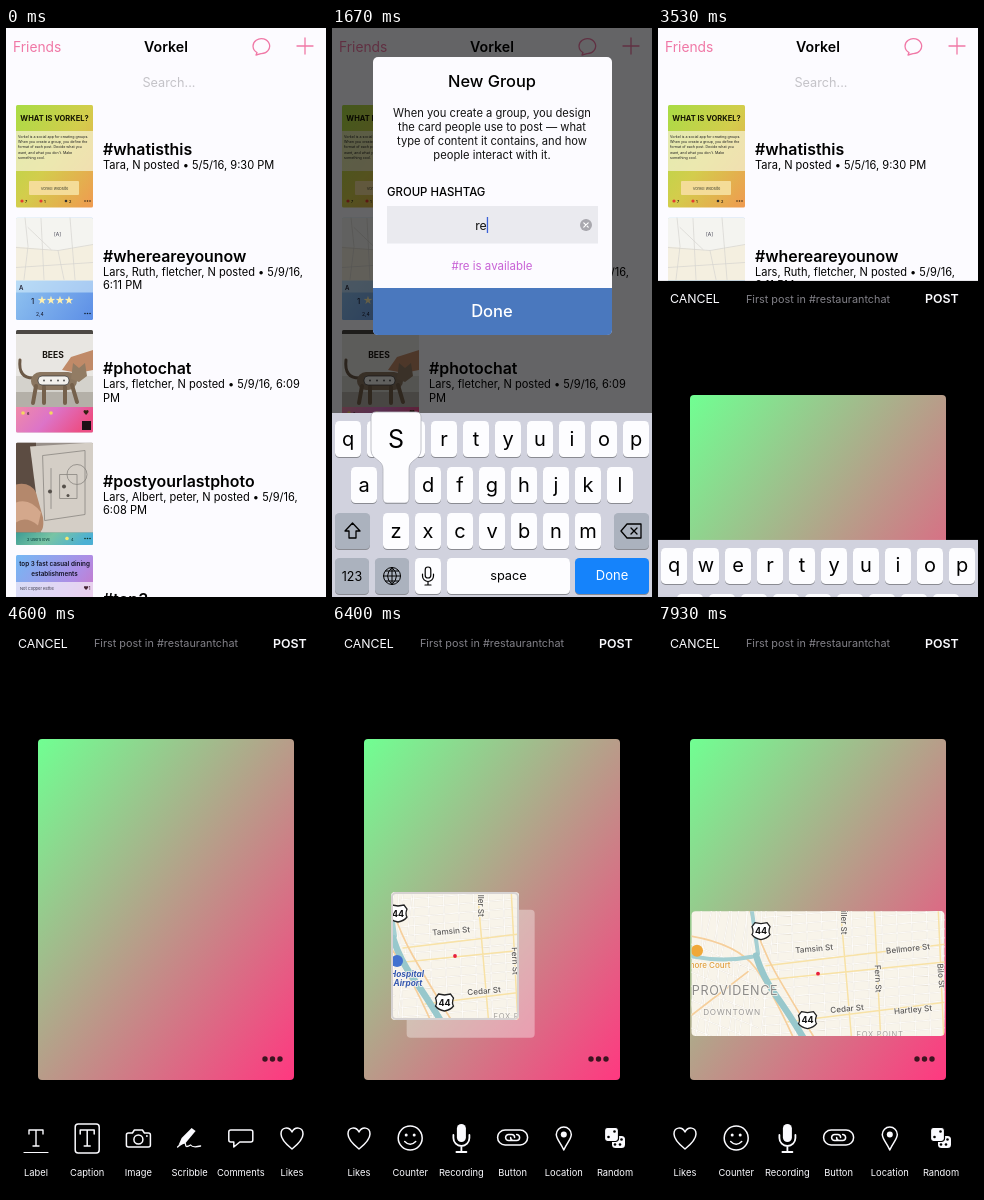
Recreate the animation shown at these times as an HTML page. Size 320x569 px, loop 8000 ms.

```html
<!DOCTYPE html>
<html lang="en">
<head>
<meta charset="utf-8">
<title>New group</title>
<style>
html, body { margin: 0; width: 100%; height: 100%; overflow: hidden; background: #fff; }
svg { display: block; width: 100%; height: 100%; font-family: Inter, "Noto Sans", sans-serif; }
text { white-space: pre; }
</style>
</head>
<body>
<svg id="stage" viewBox="0 0 320 569" preserveAspectRatio="none"></svg>
<script>
const LOOP = 8000;
const MID = 'text-anchor="middle"', SEMI = 'font-weight="600"', MED = 'font-weight="500"';
const PALE = '#fbfbff', PINK = '#f078a6';

const text = (x, y, s, size, fill = '#000', more = '') =>
  `<text x="${x}" y="${y}" font-size="${size}" fill="${fill}" ${more}>${s}</text>`;
const rect = (x, y, w, h, fill, r = 0, more = '') =>
  `<rect x="${x}" y="${y}" width="${w}" height="${h}" rx="${r}" fill="${fill}" ${more}/>`;
const circle = (x, y, r, fill, more = '') => `<circle cx="${x}" cy="${y}" r="${r}" fill="${fill}" ${more}/>`;
const line = (d, stroke, w = 1, more = '') =>
  `<path d="${d}" fill="none" stroke="${stroke}" stroke-width="${w}" stroke-linecap="round" stroke-linejoin="round" ${more}/>`;
const shape = (d, fill, more = '') => `<path d="${d}" fill="${fill}" ${more}/>`;
const group = (x, y, body, more = '') => `<g transform="translate(${x} ${y})" ${more}>${body}</g>`;
const gradient = (id, colors, x2 = 1, y2 = 1) =>
  `<linearGradient id="${id}" x2="${x2}" y2="${y2}">` +
  colors.map((c, i) => `<stop offset="${i / (colors.length - 1)}" stop-color="${c}"/>`).join('') + '</linearGradient>';

const defs = '<defs>' +
  gradient('card', ['#70ff92', '#b89c89', '#ff3880']) +
  gradient('intro', ['#a9dc45', '#d3cd4c', '#f09a50']) +
  gradient('sky', ['#a8dcf4', '#5c8ee6']) +
  gradient('berry', ['#f08aa8', '#dc74c8', '#ec4f86'], 1, .3) +
  gradient('sea', ['#3c9c94', '#78c4a4', '#4cb0d4'], 1, .2) +
  gradient('rose', ['#74b8f4', '#b08ce4', '#f0589c']) +
  '<clipPath id="thumb"><rect width="77" height="102.5" rx="1.5"/></clipPath>' +
  '<clipPath id="mapClip"><rect id="mapBox" rx="4"/></clipPath></defs>';

// ---- list of groups ----
const introLines = ['Vorkel is a social app for creating groups.', 'When you create a group, you define the',
  'format of each post. Decide what you', 'want, and what you don\'t. Make', 'something cool.'];
const dots = color => [69, 71.5, 74].map(x => circle(x, 96, .8, color)).join('');
const thumbs = [
  rect(0, 0, 77, 103, 'url(#intro)') + text(38.5, 15.5, 'WHAT IS VORKEL?', 7.5, '#141400', MID + ' font-weight="700"') +
    rect(0, 26, 77, 40, '#f4f0d0', 0, 'opacity=".75"') +
    introLines.map((s, i) => text(2, 33 + i * 5.2, s, 3.6, '#222')).join('') +
    rect(13, 76, 50, 14, '#f4dc98', 1) + text(38.5, 84.5, 'Vorkel website', 4, '#443', MID) +
    circle(6, 96, 1.6, '#e43c30') + text(9, 97.5, '7', 4) + circle(25, 96, 1.6, '#e43c30') + text(28, 97.5, '1', 4) +
    circle(50, 96, 1.3, '#333') + text(53, 97.5, '2', 4) + dots('#321'),
  rect(0, 0, 77, 103, 'url(#sky)') + rect(0, 0, 77, 63, '#f4f4f0') +
    shape('M0 29L42 33L77 27V63H0Z', '#f4efe0') +
    line('M0 30L42 33L77 27M9 0L12 29L8 62M25 1L28 62M54 0L59 62M0 50L77 45M12 10L35 32M42 33L48 62', '#d6d4d0', .7) +
    text(38, 18, '[A]', 5, '#445') + rect(0, 63, 77, 12, '#d4ecfa', 0, 'opacity=".6"') +
    text(3, 72, 'A', 6, '#223', SEMI) + text(15, 86, '1', 8, '#112') +
    [26, 35, 44, 53].map(x => text(x, 86.5, '★', 10, '#fff0b0', MID)).join('') +
    text(20, 98, '2,4', 5, '#112') + dots('#123'),
  rect(0, 0, 77, 103, '#d4d2cc') + rect(0, 0, 77, 4, '#4c4844') + rect(0, 4, 77, 42, '#e8e6e2') +
    rect(0, 62, 77, 16, '#b4b0a8') + text(37, 28, 'BEES', 8.5, '#18140f', MID + ' font-weight="700"') +
    shape('M46 40L55 27L77 20V40L62 43Z', '#c08a68') + line('M4 30Q2 48 17 48', '#6c5a48', 3) +
    rect(15, 42, 46, 18, '#8a7660', 9) + shape('M55 49L57 33L63 38L69 33L71 46L63 52Z', '#927c64') +
    line('M20 56L17 73M28 57V73M49 57V73M56 55L61 72', '#75614c', 4) +
    rect(22, 46, 31, 9, '#f2f0ec', 4, 'stroke="#333" stroke-width=".7"') +
    [28, 35, 42, 48].map(x => circle(x, 50.5, 1, '#555')).join('') +
    rect(0, 77, 77, 26, 'url(#berry)') + circle(7, 83, 1.8, '#f4d860') + text(11, 85, '6', 4) +
    circle(35, 83, 1.8, '#f4d860') + text(70, 85, '♥', 6, '#321', MID) + rect(66, 91, 9, 9, '#1c1014'),
  rect(0, 0, 77, 103, '#98908a') + rect(0, 0, 20, 90, '#5c4c42') +
    shape('M14 4L77 0V90H25Z', '#d4cec6') + line('M27 13L69 8V72L29 78ZM44 32H61V56H44ZM35 26V66', '#8a8680', .8) +
    circle(61, 32, 10, 'none', 'stroke="#8a8680" stroke-width=".8"') + circle(34, 49, 2, '#55504a') +
    circle(48, 44, 2, '#55504a') + circle(52, 53, 1.5, '#55504a') +
    shape('M0 42Q14 39 20 50L27 75Q29 91 20 90H0Z', '#b4886c') + shape('M0 60Q14 55 25 70L22 83Q10 73 0 80Z', '#d4a88c') +
    rect(0, 90, 77, 13, 'url(#sea)') + text(11, 98, '2 users love', 4, '#033') + circle(51, 96, 1.8, '#f4e870') +
    text(55, 98, '4', 4, '#033') + dots('#132'),
  rect(0, 0, 77, 103, 'url(#rose)') + text(38.5, 11, 'top 3 fast casual dining', 6.3, '#112', MID + ' ' + SEMI) +
    text(38.5, 20.5, 'establishments', 6.3, '#112', MID + ' ' + SEMI) +
    rect(0, 27, 77, 16, '#f4ecf8', 0, 'opacity=".75"') + text(4, 34.5, 'Not Copper Kettle', 4, '#334') +
    text(71, 35, '♥1', 5, '#423', MID)
];
const rows = [
  ['#whatisthis', 'Tara, N posted • 5/5/16, 9:30 PM'],
  ['#whereareyounow', 'Lars, Ruth, fletcher, N posted • 5/9/16,', '6:11 PM'],
  ['#photochat', 'Lars, fletcher, N posted • 5/9/16, 6:09', 'PM'],
  ['#postyourlastphoto', 'Lars, Albert, peter, N posted • 5/9/16,', '6:08 PM'],
  ['#top3', '']
];
const list = rect(0, 0, 320, 569, '#fcfbff') +
  text(7, 24, 'Friends', 13.8, PINK) + text(160, 24, 'Vorkel', 14.2, '#000', MID + ' ' + SEMI) +
  line('M251 24.5A8.3 7.5 0 1 1 255 25.6L250 27Z', PINK, 1.3) + line('M291 18H307M299 10V26', PINK, 1.3) +
  text(163, 59, 'Search...', 12.7, '#c4c3c8', MID) +
  rows.map(([tag, ...info], i) => {
    const y = 77 + i * 112.5, top = y + (info.length > 1 ? 44 : 50);
    return group(10, y, thumbs[i], 'clip-path="url(#thumb)"') + text(97, top, tag, 15.9, '#000', SEMI) +
      info.map((s, k) => text(97, top + 14.3 + k * 13.6, s, 11.05)).join('');
  }).join('');

// ---- new group dialog ----
const blurb = ['When you create a group, you design', 'the card people use to post — what',
  'type of content it contains, and how', 'people interact with it.'];
const dialog = rect(41, 29, 239, 278, '#fcfbff', 5) + shape('M41 260H280V302Q280 307 275 307H46Q41 307 41 302Z', '#4a78be') +
  text(160, 59, 'New Group', 16.4, '#000', MID + ' ' + MED) +
  blurb.map((s, i) => text(160, 88.5 + i * 14.2, s, 11.2, '#111', MID)).join('') +
  text(55, 168, 'GROUP HASHTAG', 11.4, '#000', MED) + rect(55, 178, 211, 37.5, '#eaeaef') +
  text(149, 201.5, '', 12.3, '#111', MID + ' id="field"') + rect(0, 189, 1.3, 16, '#3c62d8', 0, 'id="caret"') +
  `<g id="clear">${circle(254, 197, 6, '#a9a8ae')}${line('M251.8 194.8L256.2 199.2M256.2 194.8L251.8 199.2', '#fff', 1.2)}</g>` +
  text(160, 242, '', 11.5, '#c862d6', MID + ' id="status"') + text(160, 289, 'Done', 16.6, '#fff', MID + ' ' + MED);

// ---- keyboard ----
const keyPos = {};
const cap = (x, y, w, fill) => rect(x, y - 17, w, 36, '#8a8b92', 4.5) + rect(x, y - 18, w, 36, fill, 4.5);
const letters = [['qwertyuiop', 16, 411], ['asdfghjkl', 32, 457], ['zxcvbnm', 64, 503]].map(([keys, x0, y]) =>
  [...keys].map((c, i) => {
    const x = x0 + i * 32;
    keyPos[c] = [x, y];
    return cap(x - 13, y, 26, '#fdfdff') + text(x, y + 6.5, c, 20, '#000', MID);
  }).join('')).join('');
const GRAY = '#abb2be';
const keyboard = rect(0, 385, 320, 184, '#d1d2de') + letters +
  cap(3, 503, 35, GRAY) + line('M20.5 495L28 503H24V510H17V503H13Z', '#000', 1.3) +
  cap(282, 503, 35, GRAY) + line('M289 503L295 496H309V510H295ZM299 500L305 506M305 500L299 506', '#000', 1.3) +
  cap(3, 548, 34, GRAY) + text(20, 552.5, '123', 12.5, '#000', MID) + cap(43, 548, 34, GRAY) +
  line('M51.5 548A8.5 8.5 0 1 1 68.5 548A8.5 8.5 0 1 1 51.5 548M60 539.5V556.5M51.5 548H68.5M60 539.5Q51 548 60 556.5Q69 548 60 539.5M53.5 543H66.5M53.5 553H66.5', '#000', 1) +
  cap(83, 548, 26, '#fdfdff') + rect(93.2, 539, 5.6, 11, 'none', 2.8, 'stroke="#000" stroke-width="1.2"') +
  line('M90.5 546V548A5.5 5.5 0 0 0 101.5 548V546M96 553.5V557M93 557H99', '#000', 1.2) +
  cap(115, 548, 123, '#fdfdff') + text(176.5, 552.3, 'space', 12.8, '#000', MID) +
  cap(243, 548, 74, '#1583fb') + text(280, 552.3, 'Done', 13, '#fff', MID) +
  `<g id="popup">${shape('M-20 -73H20Q25 -73 25 -68V-35C25 -25 13 -26 13 -16V14Q13 18 9 18H-9Q-13 18 -13 14V-16C-13 -26 -25 -25 -25 -35V-68Q-25 -73 -20 -73Z',
    '#fdfdff', 'stroke="#b0b1ba" stroke-width=".8"')}${text(0, -37, '', 25, '#000', MID + ' id="popLetter"')}</g>`;

// ---- post editor ----
const ink = (d, w = 1.5) => line(d, PALE, w);
const ringed = `stroke="${PALE}" stroke-width="1.5"`;
const tee = 'M-7 -4V-8H7V-4M0 -8V8M-3 8H3';
const pips = (spots, r) => spots.map(([x, y]) => circle(x, y, r, '#000')).join('');
const tools = {
  Label: ink(tee, 1.4) + ink('M-12 14.5H12', 1.2),
  Caption: rect(-12, -14, 24, 29, 'none', 3, ringed) + ink(tee),
  Image: ink('M-10 -5H-6L-4 -8H4L6 -5H10Q12 -5 12 -3V7Q12 9 10 9H-10Q-12 9 -12 7V-3Q-12 -5 -10 -5Z') +
    circle(0, 1.5, 4.5, 'none', ringed) + circle(8.5, -2, .9, PALE),
  Scribble: shape('M-11 7L-8 0L2 -10L6 -7L-4 5Z', PALE) + ink('M-12 9Q-4 2 -4 7Q-4 10 1 7Q3 10 11 8', 1.3),
  Comments: ink('M-10 -8H10Q12 -8 12 -6V2Q12 4 10 4H-1L-7 9V4H-10Q-12 4 -12 2V-6Q-12 -8 -10 -8Z'),
  Likes: ink('M0 11C-5 7 -11 2 -11 -4C-11 -11 -3 -12 0 -6C3 -12 11 -11 11 -4C11 2 5 7 0 11Z'),
  Counter: circle(0, 0, 12, 'none', ringed) + circle(-4, -3, 1.5, PALE) + circle(4, -3, 1.5, PALE) + ink('M-5.5 3.5Q0 9 5.5 3.5'),
  Recording: rect(-4.5, -14, 9, 18, PALE, 4.5) + ink('M-8 -3V0A8 8 0 0 0 8 0V-3M0 8V14M-5 14H5', 1.8),
  Button: rect(-15, -8, 30, 15, 'none', 7.5, ringed) +
    ink('M1 2.5H-4A3 3 0 0 1 -4 -3.5H-1Q2 -3.5 2 -.5M4 -3.5A3 3 0 0 1 4 2.5H1Q-2 2.5 -2 -.5'),
  Location: ink('M0 12C-3 5 -7.5 1 -7.5 -3.5A7.5 7.5 0 0 1 7.5 -3.5C7.5 1 3 5 0 12Z') + circle(0, -3.5, 3, PALE),
  Random: rect(-3, -2, 13, 12, PALE, 3.5) + rect(-10.5, -10.5, 14, 14, PALE, 3, 'stroke="#000" stroke-width="1.2"') +
    pips([[-6.5, -1], [-.5, -6.5], [6.5, 1.5], [5, 6.5], [0, 6.5]], 1.3)
};
const toolbar = Object.entries(tools).map(([name, icon], i) =>
  group(30 + i * 51.2, 513, icon + text(0, 38, name, 9.35, PALE, MID))).join('');

// Map drawn around its pin at 0,0.
const label = (x, y, s, angle, size = 8.1, fill = '#5c5a58', more = MED) =>
  `<g transform="translate(${x} ${y}) rotate(${angle})">${text(0, 2.8, s, size, fill,
    MID + ' ' + more + ' stroke="#faf7f0" stroke-width="1.6" paint-order="stroke"')}</g>`;
const airport = 'font-style="italic" font-weight="700"';
let blocks = '';
for (let i = -9; i < 10; i++) blocks += `M${i * 15 + 3} -70L${i * 15 + 8} 70M-55 ${i * 9 + 7}L140 ${i * 9 - 10}`;
for (let i = 0; i < 8; i++) blocks += `M-140 ${i * 14 - 35}L-60 ${i * 14 - 2}M${-135 + i * 11} 70L${-105 + i * 9} -70`;
const shield = (x, y) => group(x, y,
  shape('M-6 -8L0 -7L6 -8L9 -4Q7 1 9 4Q6 8 0 9Q-6 8 -9 4Q-7 1 -9 -4Z', '#fff', 'stroke="#222" stroke-width="1.3"') +
  text(0, 3.6, '44', 9, '#111', MID + ' font-weight="700"'));
const map = rect(-140, -75, 280, 150, '#f8f4ea') + line(blocks, '#e9e3d8', 1.5) + line(blocks, '#fffefc', .9) +
  line('M-52 -8L140 -31M-50 6L140 -13M-30 48L140 27M22 -70L34 70M56 -70L63 70M120 -70L126 70', '#f8e2a6', 1.5) +
  line('M-130 -38Q-80 -30 -62 -5T-22 70M-70 -70Q-58 -28 -42 0T0 70M-140 52L-70 -2', '#f6cf9c', 1.7) +
  line('M-130 -18Q-96 -11 -66 -17M-66 -62L-60 -20', '#a4cfd2', 4) +
  line('M-62 -18Q-55 4 -42 22T-11 70', '#98c8cc', 6.5) +
  label(-4, -25, 'Tamsin St', -5) + label(90, -25, 'Bellmore St', -6) + label(29, 35, 'Cedar St', -5) +
  label(95, 36, 'Hartley St', -5) + label(26, -55, 'Miller St', 90) + label(60, 5, 'Fern St', 88) +
  label(123, 2, 'Bilo St', 85) + label(62, 60, 'FOX POINT', 0, 7.6, '#a3a09c', 'letter-spacing=".7"') +
  `<g id="near">${circle(-58, 5, 6, '#4272d0')}${label(-48, 18, 'Hospital', 0, 8.3, '#3458b0', airport)}` +
  `${label(-47, 27, 'Airport', 0, 8.3, '#3458b0', airport)}</g>` +
  `<g id="far">${circle(-121, -23, 6, '#f0a838')}${label(-109, -9, 'more Court', 0, 8, '#e0a040')}` +
  `${label(-83, 18, 'PROVIDENCE', 0, 12.6, '#8c8a88', 'letter-spacing=".6"')}${label(-86, 38, 'DOWNTOWN', 0, 8.2, '#9a9896', 'letter-spacing=".7"')}</g>` +
  shield(-57, -43) + shield(-10.5, 46) + circle(0, 0, 1.9, '#e8203c');

const editor = rect(0, 0, 320, 569, '#000') + text(12, 22.5, 'CANCEL', 12.3, PALE) +
  text(160, 22, 'First post in #restaurantchat', 10.85, '#828188', MID) + text(267, 22.5, 'POST', 12.4, PALE, SEMI) +
  rect(32, 114, 256, 341, 'url(#card)', 4) + [259, 266.5, 274].map(x => circle(x, 434, 2.7, '#3c1420')).join('') +
  `<g id="tools">${toolbar}</g>` + rect(0, 0, 128, 128, '#fff', 4, 'id="ghost" opacity=".36"') +
  `<g id="widget"><g clip-path="url(#mapClip)">${map}</g><rect id="rim" rx="4" fill="none" stroke="#d6d2d2" stroke-width="2"/></g>`;

document.getElementById('stage').innerHTML = defs + list +
  rect(0, 0, 320, 569, '#000', 0, 'id="dim"') + `<g id="dialog">${dialog}</g><g id="editor">${editor}</g><g id="keyboard">${keyboard}</g>`;

// ---- motion ----
const ui = {};
document.querySelectorAll('#stage [id]').forEach(n => ui[n.id] = n);
const set = (node, attrs) => { for (const k in attrs) node.setAttribute(k, attrs[k]); };
const move = (node, x, y, s = 1) => set(node, { transform: `translate(${x} ${y}) scale(${s})` });
const show = (node, on) => set(node, { visibility: on ? 'visible' : 'hidden' });
const clamp = (v, lo = 0, hi = 1) => Math.min(hi, Math.max(lo, v));
const ramp = (t, a, b) => clamp((t - a) / (b - a));
const inOut = p => p * p * (3 - 2 * p);
const out = p => 1 - (1 - p) ** 3;
const mix = (a, b, p) => a + (b - a) * p;
const spring = ms => { const x = Math.max(0, ms) * .01826; return 1 - (1 + x) * Math.exp(-x); };

const WORD = 'restaurantchat', FIRST_KEY = 1410, KEY_GAP = 116, KEY_HOLD = 85, CELL = 256 / 6;

function typing(t) {
  const since = t - FIRST_KEY, n = Math.floor(since / KEY_GAP);
  const typed = WORD.slice(0, clamp(Math.floor((since - KEY_HOLD) / KEY_GAP) + 1, 0, WORD.length));
  const pressed = n >= 0 && n < WORD.length && since % KEY_GAP < KEY_HOLD;
  show(ui.popup, pressed);
  if (pressed) {
    move(ui.popup, ...keyPos[WORD[n]]);
    ui.popLetter.textContent = WORD[n].toUpperCase();
  }
  ui.field.textContent = typed;
  ui.status.textContent = typed && `#${typed} is available`;
  set(ui.caret, { x: 149 + (typed ? ui.field.getComputedTextLength() / 2 : 0) });
  set(ui.clear, { opacity: typed ? 1 : 0 });
}

function placing(t) {
  const lift = out(ramp(t, 5750, 6350)), shift = inOut(ramp(t, 6420, 6600)), drop = out(ramp(t, 6620, 6740));
  const wide = 128 * (1 + inOut(ramp(t, 6850, 7500)));
  let x = mix(mix(231, 123, lift), 94, shift), y = mix(mix(513, 331, lift), 346, shift);
  const col = clamp(Math.round((x - 96) / CELL), 0, 3), row = clamp(Math.round((y - 178) / CELL), 0, 5);
  move(ui.ghost, 32 + col * CELL, 114 + row * CELL);
  show(ui.ghost, t > 5950 && t < 6700);
  x = mix(x, 32 + wide / 2, drop);
  y = mix(y, 348.7, drop);
  const inset = 1.6 * drop, w = wide - 2 * inset, h = 128 - 2 * inset;
  set(ui.mapBox, { x: -w / 2, y: -h / 2, width: w, height: h });
  set(ui.rim, { x: 1 - w / 2, y: 1 - h / 2, width: w - 2, height: h - 2, opacity: 1 - drop });
  show(ui.near, wide < 200);
  show(ui.far, wide >= 200);
  set(ui.widget, { opacity: ramp(t, 5750, 5850) });
  move(ui.widget, x, y, mix(.2, 1, out(ramp(t, 5750, 5980))));
}

function update(t) {
  const modal = inOut(ramp(t, 470, 730)) - inOut(ramp(t, 3110, 3350));
  set(ui.dim, { opacity: .6 * modal });
  set(ui.dialog, { opacity: modal });
  move(ui.keyboard, 0, 184 * (1 - spring(t - 600) + spring(t - 3400)));
  move(ui.editor, 0, 569 * (1 - spring(t - 3429)));
  move(ui.tools, -259 * inOut(ramp(t, 4680, 5500)), 0);
  typing(t);
  placing(t);
}

const start = performance.now();
function tick() {
  update((performance.now() - start) % LOOP);
  requestAnimationFrame(tick);
}
tick();
</script>
</body>
</html>
```
